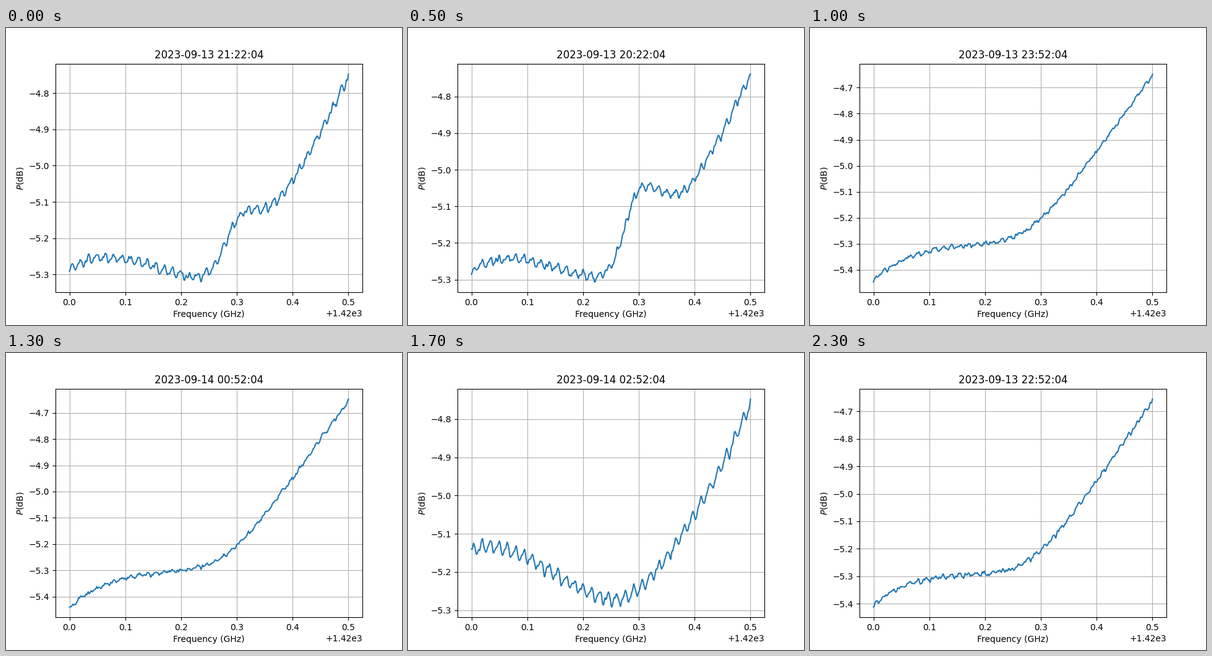
A matplotlib script that plays this animation: 640 by 480 pixels, repeating every 2400 ms.

```python
import numpy as np
import matplotlib.pyplot as plt
from matplotlib.animation import FuncAnimation

# Half-hourly spectra, shown in the order they were read
START = 16 * 60 + 22
ORDER = [10, 5, 2, 20, 8, 12, 18, 0, 14, 15, 6, 22,
         17, 3, 9, 19, 21, 1, 16, 7, 11, 4, 13]

x = np.linspace(0, 0.5, 400)


def bandpass():
    """Receiver response: a settling start, a plateau, then a steady rise."""
    rise = 2.92 * 0.03 * np.log1p(np.exp((x - 0.278) / 0.03))
    return -5.292 - 0.153 * np.exp(-x / 0.07) + rise


def tilt_shape():
    return 1.38 * np.abs(1 - x / 0.45) ** 1.5 - 0.38


def line_bump(step):
    """Emission line that fades, narrows and drifts through the evening."""
    height = max(0, 0.509 - 0.0394 * step)
    center = 0.28 + 0.0025 * step
    right = max(0.03, 0.064 - 0.003 * step)
    width = np.where(x < center, 0.026, right)
    return height * np.exp(-0.5 * ((x - center) / width) ** 2)


def texture(step, tilt):
    """Standing-wave ripple with fine noise."""
    rng = np.random.default_rng(step)
    phase = 2 * np.pi * (x - 0.4861) / 0.01508
    ripple = np.cos(phase) + 0.3 * np.sin(2 * phase)
    noise = rng.normal(0, 0.0045, x.size + 1)
    return (0.004 + 0.03 * tilt) * ripple + (noise[1:] + noise[:-1]) / 2


def power(step):
    tilt = np.interp(step, [2, 10, 13, 15, 18, 21],
                     [0.19, 0.20, 0.04, 0.01, 0.01, 0.312])
    offset = np.interp(step, [2, 10, 13, 21], [0, -0.042, -0.004, -0.012])
    smooth = bandpass() + tilt * tilt_shape() + offset + line_bump(step)
    return smooth + texture(step, tilt)


def stamp(step):
    days, minute = divmod(START + 30 * step, 1440)
    return f"2023-09-{13 + days} {minute // 60:02d}:{minute % 60:02d}:04"


fig, ax = plt.subplots(figsize=(6.4, 4.8), dpi=100)
line, = ax.plot(1420 + x, power(ORDER[0]))
title = ax.set_title(stamp(ORDER[0]))
ax.set_xlabel("Frequency (GHz)")
ax.set_ylabel("$P$(dB)")
ax.grid()


def draw(i):
    step = ORDER[max(i - 1, 0)]
    line.set_ydata(power(step))
    title.set_text(stamp(step))
    ax.relim()
    ax.autoscale_view()
    return line, title


anim = FuncAnimation(fig, draw, frames=24, interval=100, repeat=True,
                     repeat_delay=0, blit=False)
plt.show()
```
